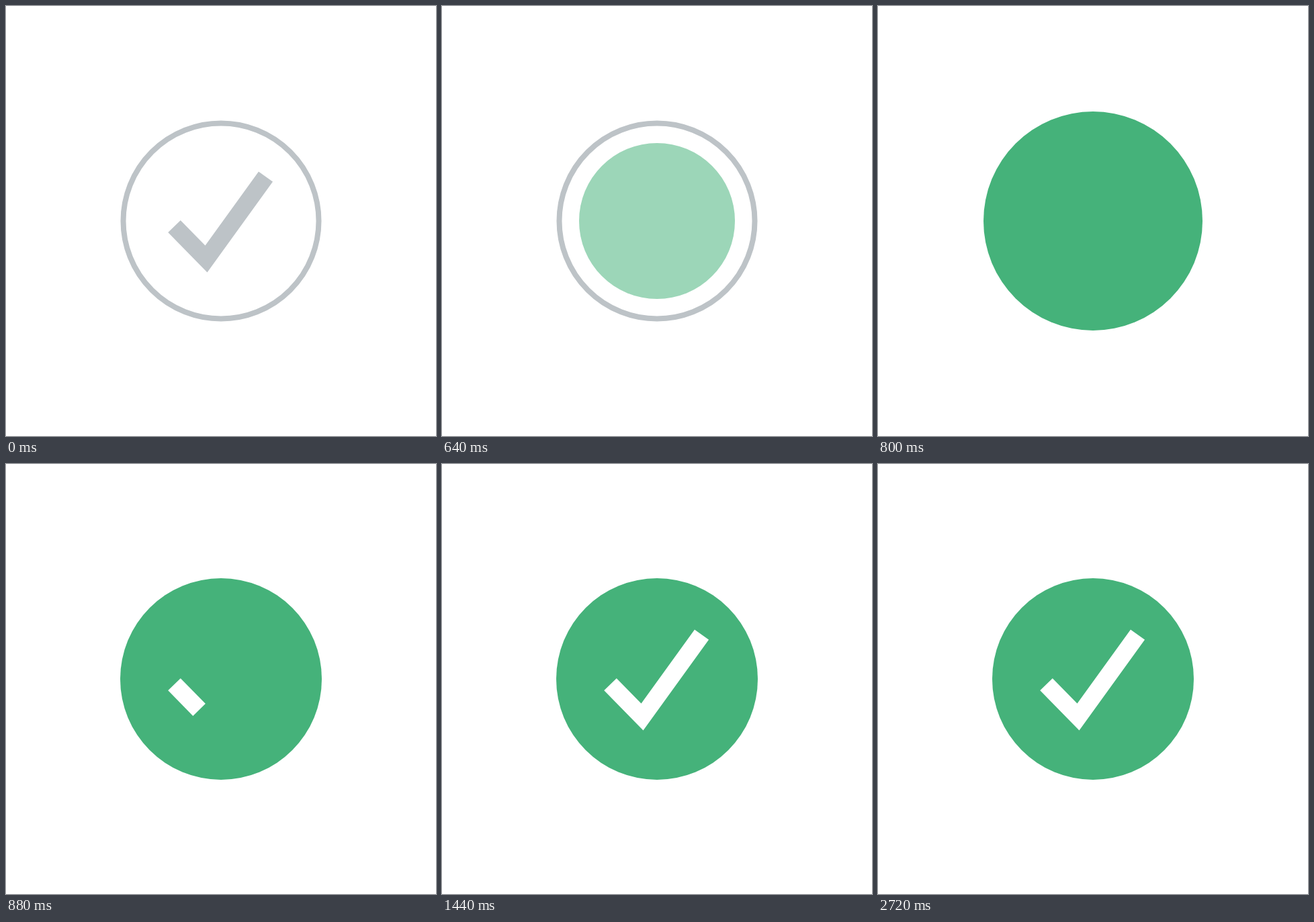
An HTML page with a canvas for the animation above (2.8 s loop, 640x640 px).

```html
<!DOCTYPE html>
<html lang="en">
<head>
<meta charset="utf-8">
<title>Check</title>
<style>
html, body { margin: 0; height: 100%; overflow: hidden; background: #fff; }
canvas { display: block; width: 100vmin; height: 100vmin; }
</style>
</head>
<body>
<canvas id="stage" width="640" height="640"></canvas>
<script>
const ctx = document.getElementById('stage').getContext('2d');
const LOOP = 2800, STEP = 80;
const GREEN = '#45b27a', GREY = '#bdc3c7';
const CHECK_LENGTH = 220;

// Piecewise linear value from [time, value] pairs
function tween(t, keys) {
  if (t <= keys[0][0]) return keys[0][1];
  for (let i = 1; i < keys.length; i++) {
    const [t0, a] = keys[i - 1], [t1, b] = keys[i];
    if (t < t1) return a + (b - a) * (t - t0) / (t1 - t0);
  }
  return keys[keys.length - 1][1];
}

function disc(radius, alpha) {
  ctx.globalAlpha = alpha;
  ctx.fillStyle = GREEN;
  ctx.beginPath();
  ctx.arc(320, 320, radius, 0, 2 * Math.PI);
  ctx.fill();
}

function ring() {
  ctx.globalAlpha = 1;
  ctx.strokeStyle = GREY;
  ctx.lineWidth = 8;
  ctx.beginPath();
  ctx.arc(320, 320, 145.5, 0, 2 * Math.PI);
  ctx.stroke();
}

function check(color, length, alpha) {
  ctx.save();
  ctx.globalAlpha = alpha;
  ctx.strokeStyle = color;
  ctx.lineWidth = 26;
  ctx.lineJoin = 'miter';
  ctx.setLineDash([length, 1000]);
  ctx.beginPath();
  ctx.moveTo(250.5, 328);
  ctx.lineTo(298, 376.5);
  ctx.lineTo(386.5, 254);
  ctx.stroke();
  ctx.restore();
}

function rays(t) {
  for (let i = 0; i < 8; i++) {
    const time = t - (i % 2) * 80; // diagonals follow the straight ones
    if (time <= 880 || time >= 1200) continue;
    const inner = tween(time, [[880, 140], [1040, 167], [1120, 260], [1200, 281]]);
    const outer = tween(time, [[880, 140], [960, 205], [1040, 257], [1120, 281]]);
    ctx.save();
    ctx.translate(320, 320);
    ctx.rotate(i * Math.PI / 4);
    ctx.globalAlpha = tween(time, [[960, 0.98], [1040, 0.64], [1200, 0]]);
    ctx.fillStyle = GREEN;
    ctx.fillRect(inner, -5, outer - inner, 10);
    ctx.restore();
  }
}

function draw(t) {
  ctx.globalAlpha = 1;
  ctx.fillStyle = '#fff';
  ctx.fillRect(0, 0, 640, 640);

  if (t < 800) ring();
  if (t < 640) check(GREY, CHECK_LENGTH, tween(t, [[480, 1], [640, 0]]));
  rays(t);
  if (t > 520) {
    const radius = tween(t, [[520, 28], [640, 116], [720, 175], [800, 163], [880, 150]]);
    disc(radius, tween(t, [[520, 0], [640, 0.53], [720, 0.887], [760, 1]]));
  }
  if (t > 829) check('#fff', tween(t, [[829, 0], [880, 53], [1040, CHECK_LENGTH]]), 1);
}

const start = performance.now();
function tick() {
  const t = (performance.now() - start) % LOOP;
  draw(Math.floor(t / STEP) * STEP);
  requestAnimationFrame(tick);
}
tick();
</script>
</body>
</html>
```
